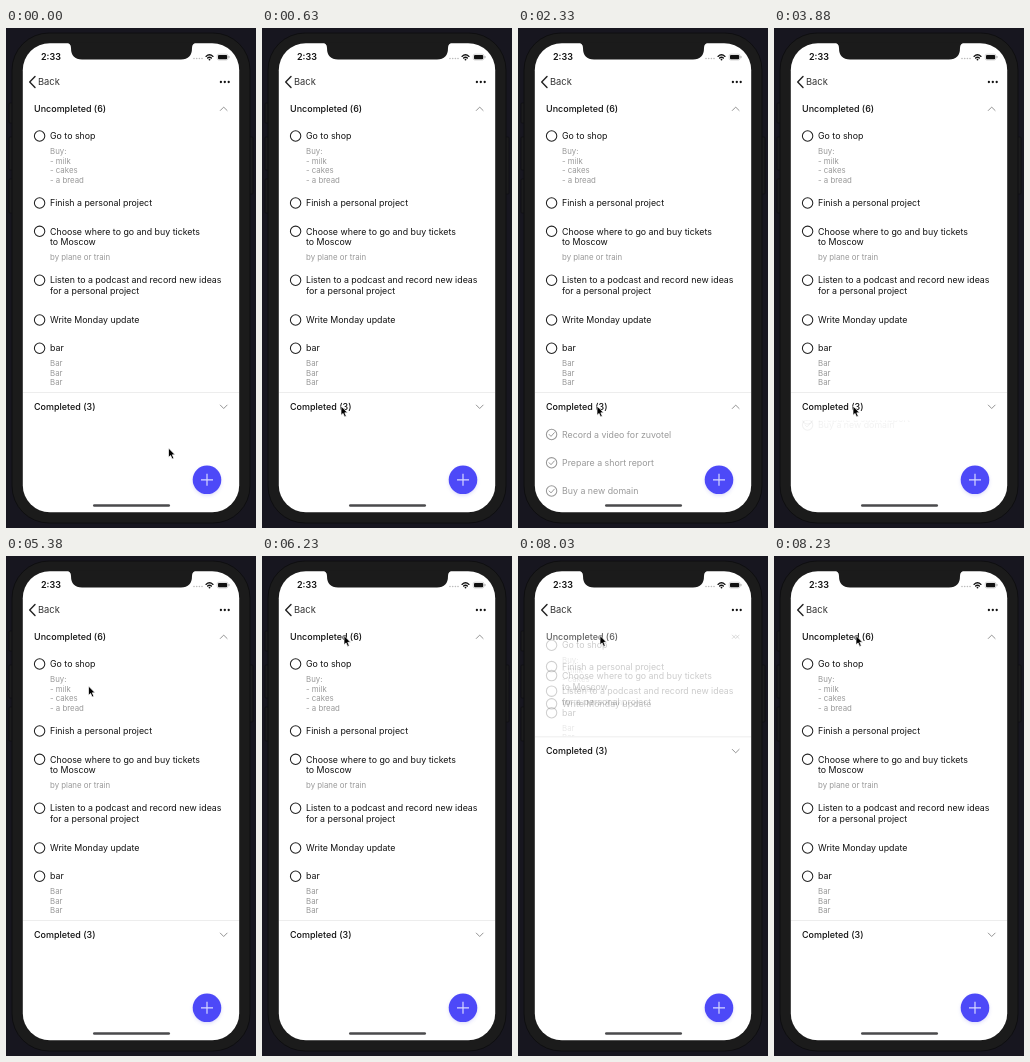
An HTML page that plays this animation: 250x500 px, repeating every 9.18 s.

```html
<!DOCTYPE html>
<html lang="en">
<head>
<meta charset="utf-8">
<title>Task list</title>
<style>
  html, body { margin: 0; width: 100%; height: 100%; overflow: hidden; background: #17161f; }
  svg { display: block; width: 100vw; height: 100vh; }
  text { font-family: Inter, "Liberation Sans", sans-serif; font-size: 8.82px; fill: #111; white-space: pre; }
  .head { font-weight: 500; font-size: 8.98px; }
  .note { font-size: 7.85px; fill: #999; }
  .done { fill: #999; }
  .line { fill: none; stroke-linecap: round; stroke-linejoin: round; }
</style>
</head>
<body>
<svg viewBox="0 0 250 500">
  <defs>
    <clipPath id="clipA"><rect x="17" width="216"/></clipPath>
    <clipPath id="clipB"><rect x="17" width="216"/></clipPath>
    <filter id="blur" x="-50%" y="-50%" width="200%" height="200%"><feGaussianBlur stdDeviation="2.2"/></filter>
  </defs>

  <!-- phone -->
  <rect width="250" height="500" fill="#17161f"/>
  <g fill="#1b1b1d" stroke="#0c0c10" stroke-width=".6">
    <rect x="3" y="75" width="5" height="20" rx="1"/>
    <rect x="3" y="109" width="5" height="33" rx="1"/>
    <rect x="3" y="151" width="5" height="34" rx="1"/>
    <rect x="242" y="109" width="5" height="57" rx="1"/>
  </g>
  <rect x="6" y="5" width="238" height="490" rx="37" fill="#1b1b1b" stroke="#0e0e10"/>
  <rect x="16.8" y="15.2" width="216.4" height="469" rx="27" fill="#fff"/>
  <path d="M60 14.5Q65 15 65 20Q65 31.4 76 31.4H175Q186 31.4 186 20Q186 15 191 14.5Z" fill="#1b1b1b"/>

  <!-- status bar -->
  <text x="35" y="32.2" style="font-weight:600;font-size:9px">2:33</text>
  <g fill="#bbb">
    <circle cx="188" cy="30.5" r=".8"/><circle cx="190.7" cy="30.5" r=".8"/>
    <circle cx="193.4" cy="30.5" r=".8"/><circle cx="196" cy="30.5" r=".8"/>
  </g>
  <path class="line" d="M200 28.4Q203.5 25.2 207 28.4M201.6 30.1Q203.5 28.4 205.4 30.1" stroke="#111" stroke-width="1.3"/>
  <circle cx="203.5" cy="31.6" r=".9" fill="#111"/>
  <rect x="211.2" y="26.2" width="10.8" height="5.8" rx="1.7" fill="none" stroke="#aaa" stroke-width=".5"/>
  <rect x="212" y="27" width="9.2" height="4.2" rx="1" fill="#111"/>
  <rect x="222.6" y="28" width=".8" height="2.2" rx=".4" fill="#999"/>

  <!-- navigation -->
  <path class="line" d="M29 48.5L23.7 54L29 59.5" stroke="#222" stroke-width="1.4"/>
  <text x="32" y="57.4" style="font-size:9.35px;fill:#333">Back</text>
  <g fill="#111"><circle cx="214.9" cy="54" r="1.15"/><circle cx="218.8" cy="54" r="1.15"/><circle cx="222.7" cy="54" r="1.15"/></g>

  <g id="listA" clip-path="url(#clipA)"></g>
  <g id="headA"></g>
  <g id="lower">
    <path d="M17 364.5H233" stroke="#e9e9e9" stroke-width=".8"/>
    <g id="headB"></g>
  </g>
  <g id="listB" clip-path="url(#clipB)"></g>

  <circle cx="201" cy="453.5" r="13.5" fill="#4b48e8" opacity=".25" filter="url(#blur)"/>
  <circle cx="201" cy="451.8" r="14.3" fill="#4d49f8"/>
  <path d="M195 451.8H207M201 445.8V457.8" stroke="#d8d8ff" stroke-width="1.2"/>
  <rect x="87" y="476.2" width="77" height="2.5" rx="1.25" fill="#4a4a4c"/>
  <path id="cursor" d="M0 0V9.3L2.1 7.4L3.6 10.9L5.3 10.2L3.8 6.8H6.6Z" fill="#000" stroke="#fff" stroke-width=".7"/>
</svg>
<script>
const LOOP = 9180, STEP = 50, OFFSET = 30;
const HEAD_A = 80.5, HEAD_B = 378.5, HEAD_HALF = 14, LIST_H = 269.5;
const $ = id => document.getElementById(id);

function el(parent, name, attrs, text) {
  const node = document.createElementNS("http://www.w3.org/2000/svg", name);
  for (const key in attrs) node.setAttribute(key, attrs[key]);
  if (text) node.textContent = text;
  return parent.appendChild(node);
}

// y of the first line, title lines, note lines
const open = [
  [108, ["Go to shop"], ["Buy:", "- milk", "- cakes", "- a bread"]],
  [175, ["Finish a personal project"], []],
  [203.3, ["Choose where to go and buy tickets", "to Moscow"], ["by plane or train"]],
  [252.2, ["Listen to a podcast and record new ideas", "for a personal project"], []],
  [292, ["Write Monday update"], []],
  [320.2, ["bar"], ["Bar", "Bar", "Bar"]]
];
const done = [
  [406.5, ["Record a video for zuvotel"], []],
  [434.8, ["Prepare a short report"], []],
  [463, ["Buy a new domain"], []]
];

function addItems(parent, items, checked) {
  return items.map(([y, lines, notes]) => {
    const g = el(parent, "g", {});
    const stroke = checked ? "#999" : "#222";
    el(g, "circle", { cx: 33.6, cy: 0, r: 5.2, fill: "none", stroke, "stroke-width": 1.05 });
    if (checked) el(g, "path", { class: "line", d: "M31.2 0L33 1.9L36.3-1.8", stroke });
    lines.forEach((s, i) => el(g, "text", { x: 44, y: 3.2 + i * 11, class: checked ? "done" : "" }, s));
    const top = 18 + (lines.length - 1) * 11;
    notes.forEach((s, i) => el(g, "text", { x: 44, y: top + i * 9.6, class: "note" }, s));
    return { g, y };
  });
}

function addHead(parent, y, label) {
  el(parent, "text", { x: 28, y: y + 3.2, class: "head" }, label);
  const chevron = d => el(parent, "path", { class: "line", d, stroke: "#888", "stroke-width": .9 });
  return {
    parent,
    up: chevron(`M214.3 ${y + 2}L217.7 ${y - 1.4}L221.1 ${y + 2}`),
    down: chevron(`M214.3 ${y - 1.4}L217.7 ${y + 2}L221.1 ${y - 1.4}`)
  };
}

const itemsA = addItems($("listA"), open, false);
const itemsB = addItems($("listB"), done, true);
const headA = addHead($("headA"), HEAD_A, "Uncompleted (6)");
const headB = addHead($("headB"), HEAD_B, "Completed (3)");

const clamp = x => Math.max(0, Math.min(1, x));
const ramp = (t, a, b) => clamp((t - a) / (b - a));
const ease = x => x < .5 ? .5 * (2 * x) ** 2.4 : 1 - .5 * (2 - 2 * x) ** 2.4;

function openA(t) {
  if (t < 6380) return 1;
  return t < 8030 ? 1 - ease(ramp(t, 6351, 6631)) : ease(ramp(t, 7914, 8194));
}

function openB(t) {
  if (t < 1730) return 0;
  if (t >= 3680) return 1 - ease(ramp(t, 3680, 3990));
  const local = t < 1880 ? 1730 : t - 110;
  return ease(ramp(local, 1640, 1930));
}

function press(t, down, release) {
  return t < down ? 1 : .65 + .35 * ramp(t, release, release + 180);
}

// time, x, y of the pointer tip
const path = [
  [30, 162.5, 420], [630, 79, 378], [4680, 79, 378],
  [5380, 82.5, 130], [5630, 82.5, 129], [6230, 82, 79.5]
];

function pointer(t) {
  let i = 0;
  while (i < path.length - 2 && t >= path[i + 1][0]) i++;
  const [a, b] = [path[i], path[i + 1]];
  const k = ramp(t, a[0], b[0]), s = k * k * (3 - 2 * k);
  return [a[1] + (b[1] - a[1]) * s, a[2] + (b[2] - a[2]) * s];
}

function placeItems(items, origin, p) {
  for (const { g, y } of items) {
    g.setAttribute("transform", `translate(0 ${origin + (y - origin) * p})`);
    g.setAttribute("opacity", p ** 1.35);
  }
}

// A closing list slides under its heading, an opening one lies over it.
function setClip(id, head, closing, bottom) {
  const rect = $(id).firstElementChild;
  const top = closing ? head + HEAD_HALF : head - HEAD_HALF;
  rect.setAttribute("y", top);
  rect.setAttribute("height", Math.max(0, bottom - top));
}

function setHead(head, p, closing, opacity) {
  const up = clamp(closing ? p * 2 - 1 : p * 1.5);
  head.parent.setAttribute("opacity", opacity);
  head.up.setAttribute("opacity", up);
  head.down.setAttribute("opacity", 1 - up);
}

function render(now) {
  const time = now % LOOP;
  const t = time < OFFSET ? 0 : Math.floor((time - OFFSET) / STEP) * STEP + OFFSET;
  const a = openA(t), b = openB(t);
  const closingA = t >= 6380 && t < 8030, closingB = t >= 3680;

  placeItems(itemsA, HEAD_A, a);
  placeItems(itemsB, HEAD_B, b);
  setClip("clipA", HEAD_A, closingA, HEAD_A + HEAD_HALF + LIST_H * a);
  setClip("clipB", HEAD_B, closingB, 484);
  $("lower").setAttribute("transform", `translate(0 ${LIST_H * (a - 1)})`);
  setHead(headA, a, closingA, press(t, 7630, 8030));
  setHead(headB, b, closingB, press(t, 1730, 1830));
  $("cursor").setAttribute("transform", `translate(${pointer(t)})`);
}

function frame() {
  render(performance.now());
  requestAnimationFrame(frame);
}
frame();
</script>
</body>
</html>
```
